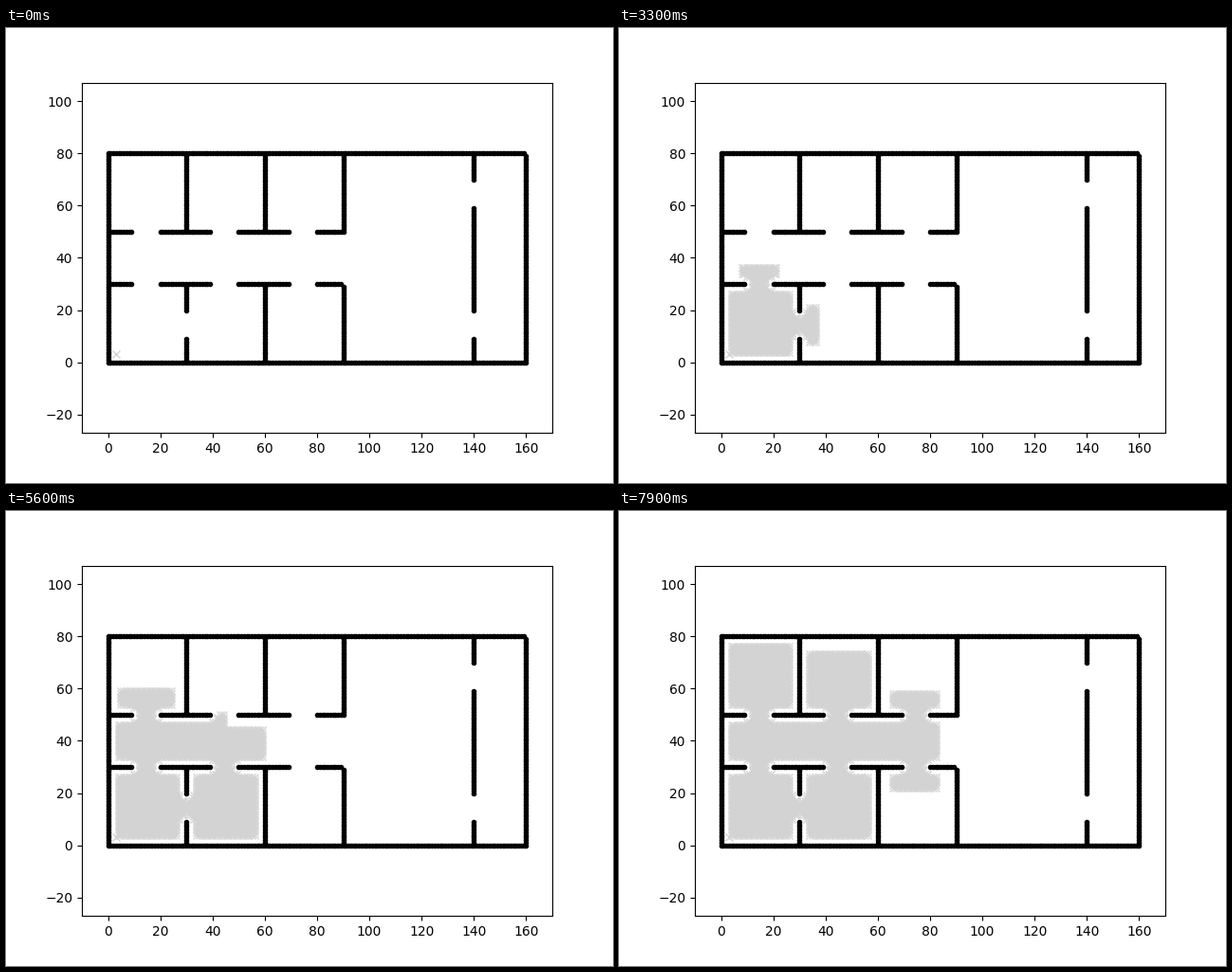
Write a matplotlib script that moves like this. It is 640 px wide and 480 px high and loops after 8 s.

```python
import numpy as np
import matplotlib.pyplot as plt
from matplotlib.animation import FuncAnimation

FRAMES, INTERVAL = 80, 100
WIDTH, HEIGHT = 160, 80
START = (3, 3)
RADIUS = 3


def hwall(y, *spans):
    return [(x, y) for a, b in spans for x in range(a, b + 1)]


def vwall(x, *spans):
    return [(x, y) for a, b in spans for y in range(a, b + 1)]


def floor_plan():
    pts = hwall(0, (0, 160)) + hwall(80, (0, 159))
    pts += vwall(0, (0, 80)) + vwall(160, (0, 79))
    pts += hwall(30, (0, 9), (20, 39), (50, 69), (80, 89))
    pts += hwall(50, (0, 9), (20, 39), (50, 69), (80, 90))
    pts += vwall(30, (0, 9), (20, 30), (50, 80))
    pts += vwall(60, (0, 30), (50, 80))
    pts += vwall(90, (0, 29), (50, 80))
    pts += vwall(140, (0, 9), (20, 59), (70, 80))
    return np.array(sorted(set(pts)))


def free_cells(walls):
    """Cells farther than the robot radius from every wall point."""
    gx, gy = np.mgrid[0:WIDTH + 1, 0:HEIGHT + 1]
    free = np.ones(gx.shape, bool)
    for x, y in walls:
        free &= np.hypot(gx - x, gy - y) > RADIUS
    return free


def flood(free):
    """Breadth-first step count of every cell, with 8 neighbours."""
    steps = np.full(free.shape, FRAMES)
    steps[START] = 0
    front = [START]
    for n in range(1, FRAMES):
        reached = []
        for x, y in front:
            for dx in (-1, 0, 1):
                for dy in (-1, 0, 1):
                    cell = x + dx, y + dy
                    if free[cell] and steps[cell] == FRAMES:
                        steps[cell] = n
                        reached.append(cell)
        front = reached
    return steps


walls = floor_plan()
steps = flood(free_cells(walls))

fig, ax = plt.subplots(figsize=(6.4, 4.8), dpi=100)
half = 90 * (0.77 * 480) / (0.775 * 640)
ax.set(xlim=(-10, 170), ylim=(40 - half, 40 + half))
ax.plot(walls[:, 0], walls[:, 1], ".k")
visited, = ax.plot([], [], "x", color="lightgray")


def update(i):
    visited.set_data(*np.nonzero(steps <= i))
    return visited,


anim = FuncAnimation(fig, update, frames=FRAMES, interval=INTERVAL,
                     repeat=True, repeat_delay=0)
plt.show()
```
